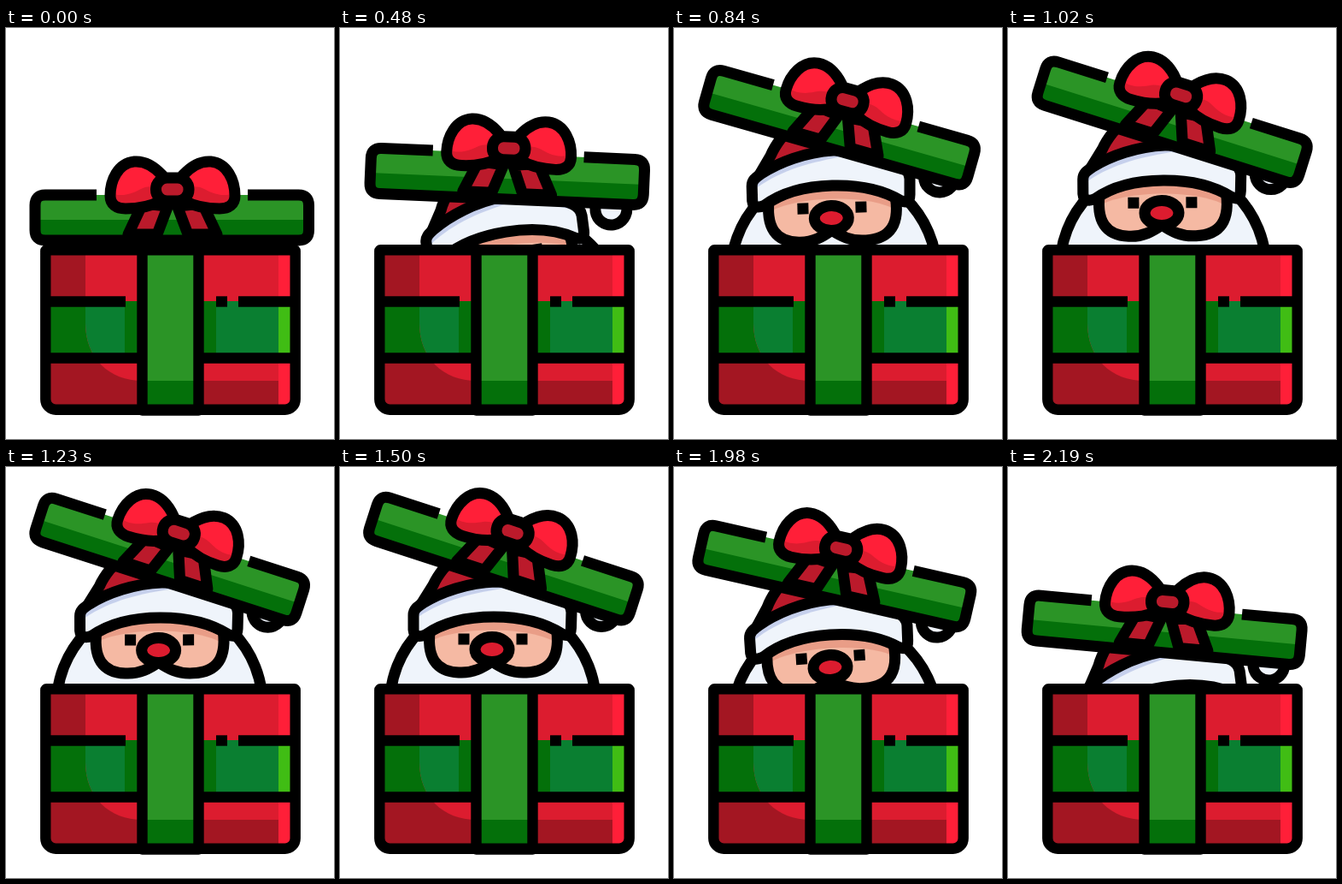
Recreate the animation shown at these times as an HTML page with a canvas. Size 384x480 px, loop 2220 ms.

```html
<!DOCTYPE html>
<html lang="en">
<head>
<meta charset="utf-8">
<title>Gift box</title>
<style>
html, body { margin: 0; width: 100%; height: 100%; overflow: hidden; background: #fff; }
canvas { display: block; width: 384px; height: 480px; }
</style>
</head>
<body>
<canvas id="stage"></canvas>
<script>
const canvas = document.getElementById('stage');
const ctx = canvas.getContext('2d');
const ratio = window.devicePixelRatio || 1;
canvas.width = 384 * ratio;
canvas.height = 480 * ratio;

const LOOP = 2220, STEP = 30, OPEN = 480, TOP = 1500, LINE = 13, BOX_LINE = 12.4;
const C = {
  red: '#dc1c2f', bright: '#ff1f38', wine: '#a31622', rose: '#bb1a2b',
  leaf: '#2b9426', dark: '#04700a', teal: '#0a7f31', lime: '#40bd14',
  white: '#eff4fb', lilac: '#c6d0ec', skin: '#f5b9a3', blush: '#e99d87'
};

// time, lid x, y, degrees, head x, y, degrees
const rise = [
  [450, 195, 188, 0, 203, 345, -12],
  [480, 198, 140, 2.5, 198, 276, -9],
  [660, 204, 99, 12, 191.5, 236, -4.3],
  [1020, 203, 78, 17.5, 180, 216, -0.4],
  [1500, 202.5, 75.5, 18, 178, 213, 0]
];
const fall = [
  [1500, 202.5, 75.5, 18, 178, 213, 0],
  [1980, 196, 95, 12.8, 183, 234, -3.8],
  [2070, 192, 109, 10.2, 184, 248, -5],
  [2190, 187, 157, 5.3, 186, 295, -9],
  [2220, 185, 188, 3, 187, 330, -11]
];

const sinceOpen = t => Math.sqrt(t - 450);
const beforeShut = t => -Math.sqrt(LOOP - t);

// Monotone cubic through one column of keys, over warped time
function track(keys, warp, col, t) {
  const x = keys.map(k => warp(k[0])), y = keys.map(k => k[col]);
  const slope = i => (y[i + 1] - y[i]) / (x[i + 1] - x[i]);
  const tangent = i => {
    if (keys[i][0] === TOP) return 0;
    if (i === 0) return slope(0);
    if (i === keys.length - 1) return slope(i - 1);
    const a = slope(i - 1), b = slope(i);
    return a * b <= 0 ? 0 : 2 * a * b / (a + b);
  };
  const now = warp(t);
  let i = 0;
  while (i < keys.length - 2 && now >= x[i + 1]) i++;
  const h = x[i + 1] - x[i], s = (now - x[i]) / h, r = 1 - s;
  return y[i] * r * r * (1 + 2 * s) + y[i + 1] * s * s * (3 - 2 * s)
    + h * s * r * (tangent(i) * r - tangent(i + 1) * s);
}

function pose(t) {
  if (t < OPEN) return rise[0].slice(1);
  const keys = t < TOP ? rise : fall;
  const warp = t < TOP ? sinceOpen : beforeShut;
  return [1, 2, 3, 4, 5, 6].map(col => track(keys, warp, col, t));
}

const shape = d => new Path2D(d);
function fill(path, color) { ctx.fillStyle = color; ctx.fill(path); }
function ink(path) { ctx.stroke(path); }
function rect(x0, y0, x1, y1, color) {
  ctx.fillStyle = color;
  ctx.fillRect(x0, y0, x1 - x0, y1 - y0);
}
function line(x0, y0, x1, y1) {
  ctx.beginPath();
  ctx.moveTo(x0, y0);
  ctx.lineTo(x1, y1);
  ctx.stroke();
}
function oval(x, y, rx, ry) {
  const p = new Path2D();
  p.ellipse(x, y, rx, ry, 0, 0, Math.PI * 2);
  return p;
}
function round(x0, y0, x1, y1, r) {
  const p = new Path2D();
  p.roundRect(x0, y0, x1 - x0, y1 - y0, r);
  return p;
}
function clipped(path, draw) {
  ctx.save();
  ctx.clip(path);
  draw();
  ctx.restore();
}
// Draws around a home point, moved to (x, y) and turned
function placed(x, y, deg, homeX, homeY, draw) {
  ctx.save();
  ctx.translate(x, y);
  ctx.rotate(deg * Math.PI / 180);
  ctx.translate(-homeX, -homeY);
  draw();
  ctx.restore();
}

const hat = shape('M92 165L109 138Q113 129 121 119C138 98 190 95 230 108C265 115 297 130 306 160C295 142 270 138 258 158Z');
const brim = shape('M86 173C86 166 91 163 97 159C118 146 150 135 182 134C214 134 244 143 262 155Q271 161 271 170L270.5 188Q270 200 260 195C238 181 210 175 180 175C148 175 120 182 100 196Q87 201 86 190Z');
const brimLight = shape('M86 179C116 157 150 148 190 142C220 146 250 155 275 168V205H86Z');
const face = shape('M106 186C100 223 113 239 139 240C156 241 168 234 178 227C188 234 200 241 218 240C246 239 259 223 253 186C230 170 128 170 106 186Z');
const faceLight = shape('M100 207C130 185 226 185 256 207V250H100Z');
const beard = oval(179, 277, 120.5, 121);
const bobble = oval(306, 168, 18.5, 18.5);
const nose = oval(178, 213, 20, 14.5);

function drawSanta() {
  fill(beard, C.white);
  ink(beard);
  fill(bobble, C.lilac);
  clipped(bobble, () => fill(oval(310, 167, 17, 18), C.white));
  ink(bobble);
  fill(hat, C.rose);
  ink(hat);
  fill(face, C.blush);
  clipped(face, () => fill(faceLight, C.skin));
  ink(face);
  fill(brim, C.lilac);
  clipped(brim, () => fill(brimLight, C.white));
  ink(brim);
  for (const x of [145, 213]) rect(x - 6.5, 194.5, x + 6.5, 207.5, '#000');
  fill(nose, C.red);
  ink(nose);
}

const lid = round(34, 195, 354.5, 248, 12);
const lidEdge = shape('M106 195H46Q34 195 34 207V236Q34 248 46 248H342.5Q354.5 248 354.5 236V207Q354.5 195 342.5 195H283');
const loop = shape('M183 172C172 160 162 155 150 156C131 158 122 178 122 196C122 206 129 211 140 211C156 211 170 208 181 202Z');
const loopShade = shape('M118 191C136 200 150 192 158 188C166 184 174 185 185 188V216H118Z');
const tail = shape('M160 205L143 241H177L189.5 208Z');
const knot = round(175.5, 175, 214, 202, 13);

function halfBow() {
  fill(tail, C.rose);
  ink(tail);
  fill(loop, C.bright);
  clipped(loop, () => fill(loopShade, C.red));
  ink(loop);
}

function drawLid() {
  fill(lid, C.leaf);
  clipped(lid, () => rect(30, 224, 360, 250, C.dark));
  ink(lidEdge);
  halfBow();
  ctx.save();
  ctx.translate(390, 0);
  ctx.scale(-1, 1);
  halfBow();
  ctx.restore();
  fill(knot, C.rose);
  ink(knot);
}

const box = round(46.3, 259.3, 338.7, 445.7, [1, 1, 12, 12]);
const lit = shape('M93 255H160V412C120 412 93 385 93 345Z');
const band = shape('M159.5 260V446.5H225.5V260');

function drawBox() {
  clipped(box, () => {
    rect(46, 259, 160, 446, C.wine);
    rect(46, 319, 160, 386, C.dark);
    clipped(lit, () => {
      rect(90, 259, 160, 446, C.red);
      rect(90, 319, 139, 386, C.teal);
      rect(139, 319, 160, 386, C.dark);
    });
    rect(159, 259, 226, 412, C.leaf);
    rect(159, 412, 226, 446, C.dark);
    rect(225, 259, 319, 412, C.red);
    rect(225, 412, 319, 446, C.wine);
    rect(319, 259, 339, 446, C.bright);
    rect(225, 319, 246, 386, C.dark);
    rect(246, 319, 319, 386, C.teal);
    rect(319, 319, 339, 386, C.lime);
  });
  ctx.lineWidth = BOX_LINE;
  ink(box);
  ink(band);
  line(46, 319.5, 140, 319.5);
  line(246, 319.5, 259, 319.5);
  line(272, 319.5, 338, 319.5);
  line(46, 385.5, 160, 385.5);
  line(226, 385.5, 338, 385.5);
}

const start = performance.now();
function frame() {
  const elapsed = Math.max(0, performance.now() - start) % LOOP;
  const t = Math.floor(elapsed / STEP) * STEP;
  const [lx, ly, la, hx, hy, ha] = pose(t);
  ctx.setTransform(ratio, 0, 0, ratio, 0, 0);
  rect(0, 0, 384, 480, '#fff');
  ctx.strokeStyle = '#000';
  ctx.lineWidth = LINE;
  ctx.lineJoin = 'round';
  if (t >= OPEN) {
    // The box hides everything below its rim
    ctx.save();
    ctx.beginPath();
    ctx.rect(0, 0, 384, 262);
    ctx.clip();
    placed(hx, hy, ha, 178, 213, drawSanta);
    ctx.restore();
  }
  placed(lx, ly, la, 195, 188, drawLid);
  drawBox();
  requestAnimationFrame(frame);
}
frame();
</script>
</body>
</html>
```
